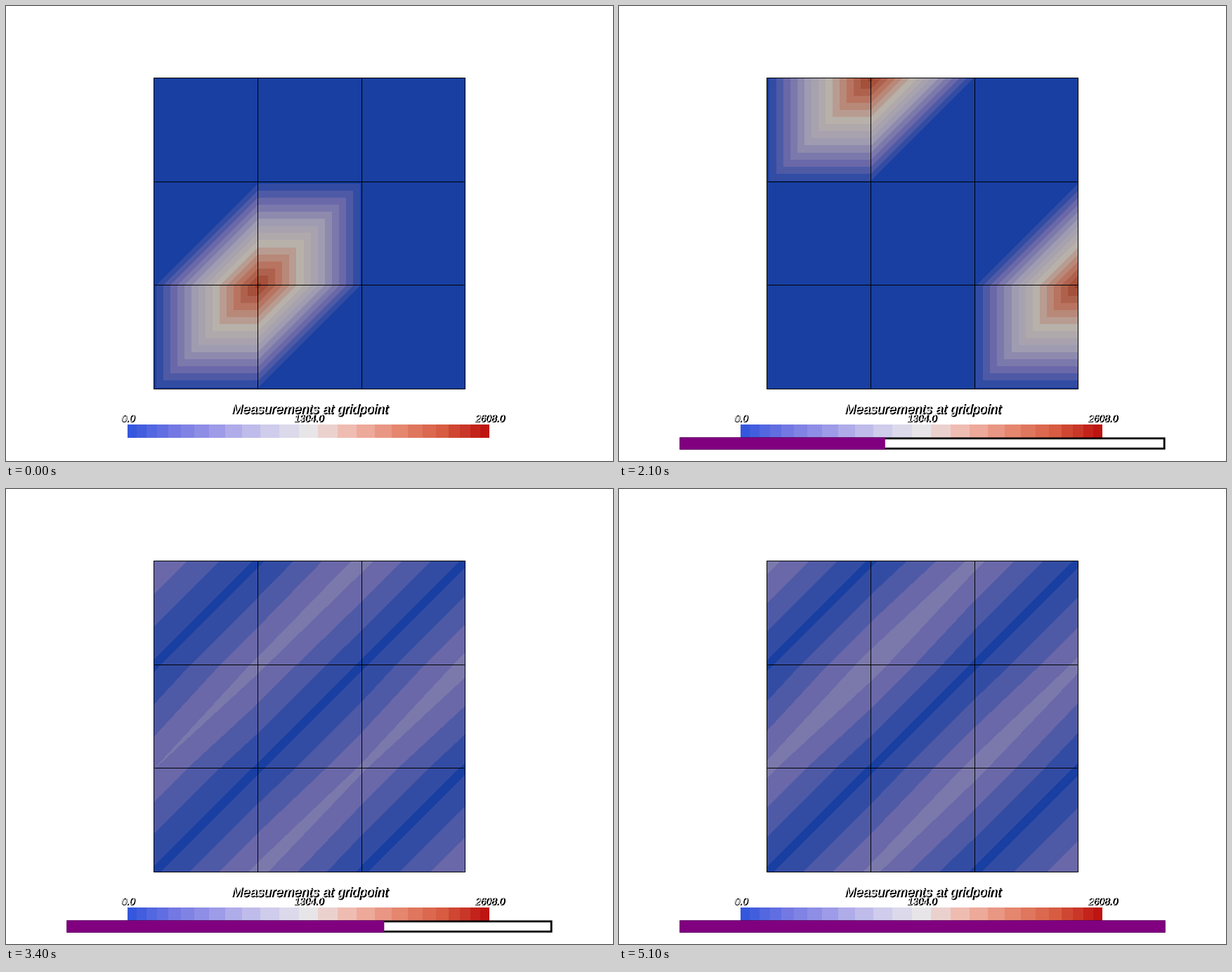
Recreate the animation shown at these times as a matplotlib script. Size 864 px wide and 648 px high, loop 5200 ms.

```python
import numpy as np
import matplotlib.pyplot as plt
from matplotlib.animation import FuncAnimation
from matplotlib.colors import LinearSegmentedColormap
from matplotlib.patches import Rectangle
from matplotlib.patheffects import withStroke

W, H, DPI = 864, 648, 100
FRAMES, INTERVAL = 52, 100
LEVELS = FRAMES // 2

GRID_X, GRID_Y, CELL = 210.4, 102.3, 147.55
SIDE = round(3 * CELL)
BAND, BANDS = 0.067, 16

LEGEND_X, LEGEND_Y, LEGEND_W, LEGEND_H = 173, 596, 515, 19
LEGEND_STEPS = 25

BAR_X, BAR_Y, BAR_W, BAR_H = 0.1 * W, 614.4, 0.8 * W, 17.3
BORDER = 2.8

surface_map = LinearSegmentedColormap.from_list("surface", [
    "#183fa1", "#6a68a9", "#9f9bb1", "#b8b1aa", "#b87460", "#9c3f29"])
legend_map = LinearSegmentedColormap.from_list("legend", [
    "#2f54dd", "#7277e2", "#9f9ce8", "#cbc8ec", "#e8e6ea",
    "#f0b5a9", "#e58770", "#d65a40", "#bb0e0c"])


def node_values(step):
    """Normalised counts at the 4 x 4 grid points, indexed [y, x]."""
    y, x = np.indices((4, 4))
    if step % 2:
        noise = np.random.default_rng(step).normal(0, 0.01, (4, 4))
        return np.where((x + y) % 2, 0.234 + noise, 0)
    if step % 4:
        return np.where((x + y == 4) & (x % 2 == 1) & (x != y), 0.98, 0)
    return np.where((x == 1) & (y == 1), 0.98, 0)


def surface(step):
    """Linear interpolation over two triangles per cell, cut into bands."""
    v = node_values(step)
    pos = np.arange(SIDE) / (SIDE - 1) * 3
    gx, gy = np.meshgrid(pos, pos[::-1])
    ix = np.minimum(gx.astype(int), 2)
    iy = np.minimum(gy.astype(int), 2)
    fx, fy = gx - ix, gy - iy
    a, b = v[iy, ix], v[iy, ix + 1]
    c, d = v[iy + 1, ix], v[iy + 1, ix + 1]
    lower = a + (b - a) * fx + (d - b) * fy
    upper = a + (c - a) * fy + (d - c) * fx
    value = np.where(fx >= fy, lower, upper)
    band = np.floor((value + 0.8 * BAND) / BAND)
    return surface_map(band / (BANDS - 1))


fig = plt.figure(figsize=(W / DPI, H / DPI), dpi=DPI, facecolor="white")
ax = fig.add_axes([0, 0, 1, 1])
ax.axis("off")


def box(x, y, w, h, color, z, smooth=False):
    patch = Rectangle((x, y), w, h, fc=color, lw=0, antialiased=smooth,
                      snap=not smooth, zorder=z)
    ax.add_patch(patch)
    return patch


def label(x, y, text, px):
    """White slanted text over a heavier black drop shadow."""
    style = dict(fontsize=px * 72 / DPI, family="Liberation Sans",
                 style="italic", ha="center", va="baseline")
    ax.text(x + 1, y + 1, text, color="black", zorder=5,
            path_effects=[withStroke(linewidth=0.6, foreground="black")],
            **style)
    ax.text(x, y, text, color="white", zorder=6, **style)


left, top = round(GRID_X), round(GRID_Y)
surfaces = [surface(step) for step in range(LEVELS)]
image = ax.imshow(surfaces[0], interpolation="nearest", zorder=1,
                  extent=(left + 1, left + 1 + SIDE, top + 1 + SIDE, top + 1))
ax.set_xlim(0, W)
ax.set_ylim(H, 0)
ax.set_aspect("auto")

for k in range(4):
    box(round(GRID_X + k * CELL), top, 1, SIDE + 1, "black", 2)
    box(left, round(GRID_Y + k * CELL), SIDE + 1, 1, "black", 2)

# Legend steps are narrower towards both ends
u = np.linspace(0, 1, LEGEND_STEPS + 1)
edges = np.round(LEGEND_X + LEGEND_W * (u - 0.35 * np.sin(2 * np.pi * u) / (2 * np.pi)))
for x0, x1 in zip(edges, edges[1:]):
    tone = ((x0 + x1) / 2 - LEGEND_X) / LEGEND_W
    box(x0, LEGEND_Y, x1 - x0, LEGEND_H, legend_map(tone), 3)

label(432, 580, "Measurements at gridpoint", 18.8)
for k, text in enumerate(("0.0", "1304.0", "2608.0")):
    label(LEGEND_X + 0.5 + k * LEGEND_W / 2, 591.5, text, 13.8)

bar = [
    box(BAR_X, BAR_Y, BAR_W, BAR_H, "black", 7, smooth=True),
    box(BAR_X + BORDER, BAR_Y + BORDER, BAR_W - 2 * BORDER,
        BAR_H - 2 * BORDER, "white", 8, smooth=True),
    box(BAR_X, BAR_Y, 0, BAR_H, "#800080", 9, smooth=True),
]


def update(i):
    """The surface advances on even frames, the bar on odd ones."""
    image.set_data(surfaces[i // 2])
    level = (i + 1) // 2
    for patch in bar:
        patch.set_visible(level > 0)
    bar[-1].set_width(BAR_W * level / LEVELS)
    return image, *bar


anim = FuncAnimation(fig, update, frames=FRAMES, interval=INTERVAL,
                     repeat=True, repeat_delay=0, blit=False)
plt.show()
```
